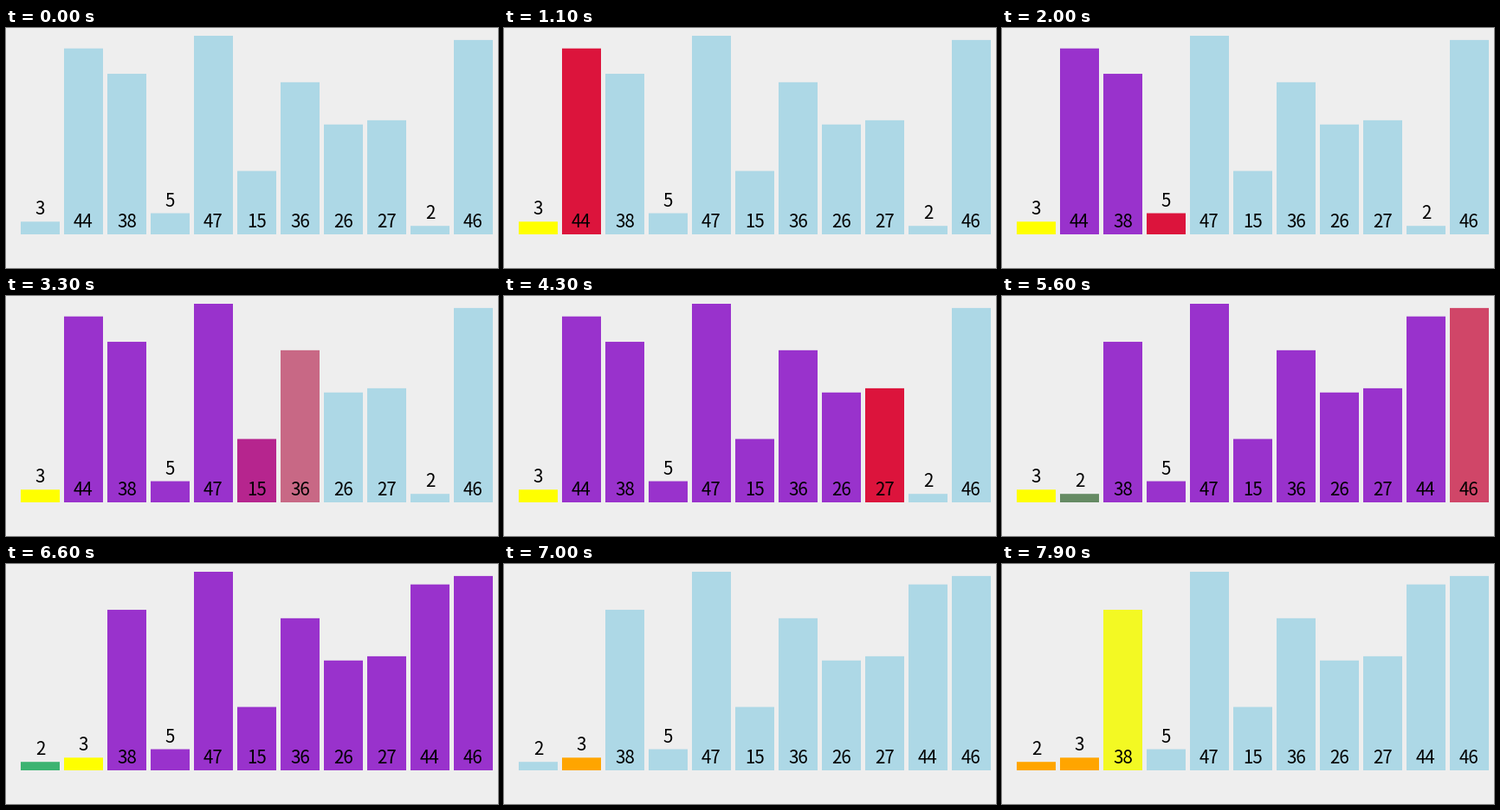
A matplotlib script that plays this animation: 568x278 px, repeating every 8 s.

```python
import matplotlib.pyplot as plt
import numpy as np
from matplotlib.animation import FuncAnimation
from matplotlib.colors import to_rgb
from matplotlib.patches import Rectangle

W, H, DPI = 568, 278, 100
STEP_MS, FRAMES = 100, 80
FADE_MS = 200
BASE, UNIT = 239, 230 / 47
BAR_W, PITCH, LEFT = 45, 50, 17

VALUES = [3, 44, 38, 5, 47, 15, 36, 26, 27, 2, 46]
N = len(VALUES)

IDLE, PIVOT, SCAN = "lightblue", "yellow", "crimson"
HIGH, LOW, DONE = "darkorchid", "mediumseagreen", "orange"


def paint(**changes):
    """Colour changes keyed as b<index>."""
    return {int(key[1:]): color for key, color in changes.items()}


def scan(i):
    """Move the scanning mark to bar i; the one before is filed as high."""
    step = {i: SCAN}
    if i > 1:
        step[i - 1] = HIGH
    return step


# (start in ms, colour changes by bar, pair of bars that trade places)
scan_starts = [900, 1390, 1810, 2290, 2710, 3195, 3605, 4100, 4590]
EVENTS = [(450, paint(b0=PIVOT), None)]
EVENTS += [(t, scan(i + 1), None) for i, t in enumerate(scan_starts)]
EVENTS += [
    (5050, {}, (1, 9)),
    (5480, paint(b9=LOW, b10=SCAN), None),
    (5905, paint(b10=HIGH), None),
    (6350, {}, (0, 9)),
    (6800, {i: DONE if i == 0 else IDLE for i in range(N)}, None),
    (7300, paint(b9=DONE), None),
    (7767, paint(b2=PIVOT), None),
]


def ease(t):
    """Cubic in-out."""
    t = min(max(t, 0), 1)
    return 4 * t**3 if t < 0.5 else 1 - 4 * (1 - t) ** 3


def mix(a, b, p):
    return a + (b - a) * p


def state(ms):
    """Colours and slot positions of all bars at a given time."""
    colors = np.array([to_rgb(IDLE)] * N)
    slots = np.arange(N, dtype=float)
    for start, changes, swap in EVENTS:
        if ms <= start:
            break
        p = ease((ms - start) / FADE_MS)
        for i, color in changes.items():
            colors[i] = mix(colors[i], np.array(to_rgb(color)), p)
        if swap:
            a, b = swap
            slots[a], slots[b] = mix(slots[a], slots[b], p), mix(slots[b], slots[a], p)
    return colors, slots


fig = plt.figure(figsize=(W / DPI, H / DPI), dpi=DPI, facecolor="#eeeeee")
ax = fig.add_axes([0, 0, 1, 1])
ax.set_xlim(0, W)
ax.set_ylim(H, 0)
ax.axis("off")

bars, labels = [], []
for i, value in enumerate(VALUES):
    height = value * UNIT
    bar = Rectangle((0, BASE - height), BAR_W, height, lw=0, zorder=i + 1, snap=False)
    foot = BASE - height if height < 30 else BASE
    label = ax.text(0, foot - 8, str(value), ha="center", va="baseline",
                    family="Noto Sans CJK JP", size=20.5 * 72 / DPI,
                    color="black", zorder=i + 1.5)
    bars.append(ax.add_patch(bar))
    labels.append(label)


def draw(frame):
    colors, slots = state(frame * STEP_MS)
    for bar, label, color, slot in zip(bars, labels, colors, slots):
        x = LEFT + PITCH * slot
        bar.set_x(x)
        bar.set_facecolor(color)
        label.set_x(x + BAR_W / 2)
    return bars + labels


anim = FuncAnimation(fig, draw, frames=FRAMES, interval=STEP_MS, repeat=True,
                     repeat_delay=0, blit=False)
plt.show()
```
